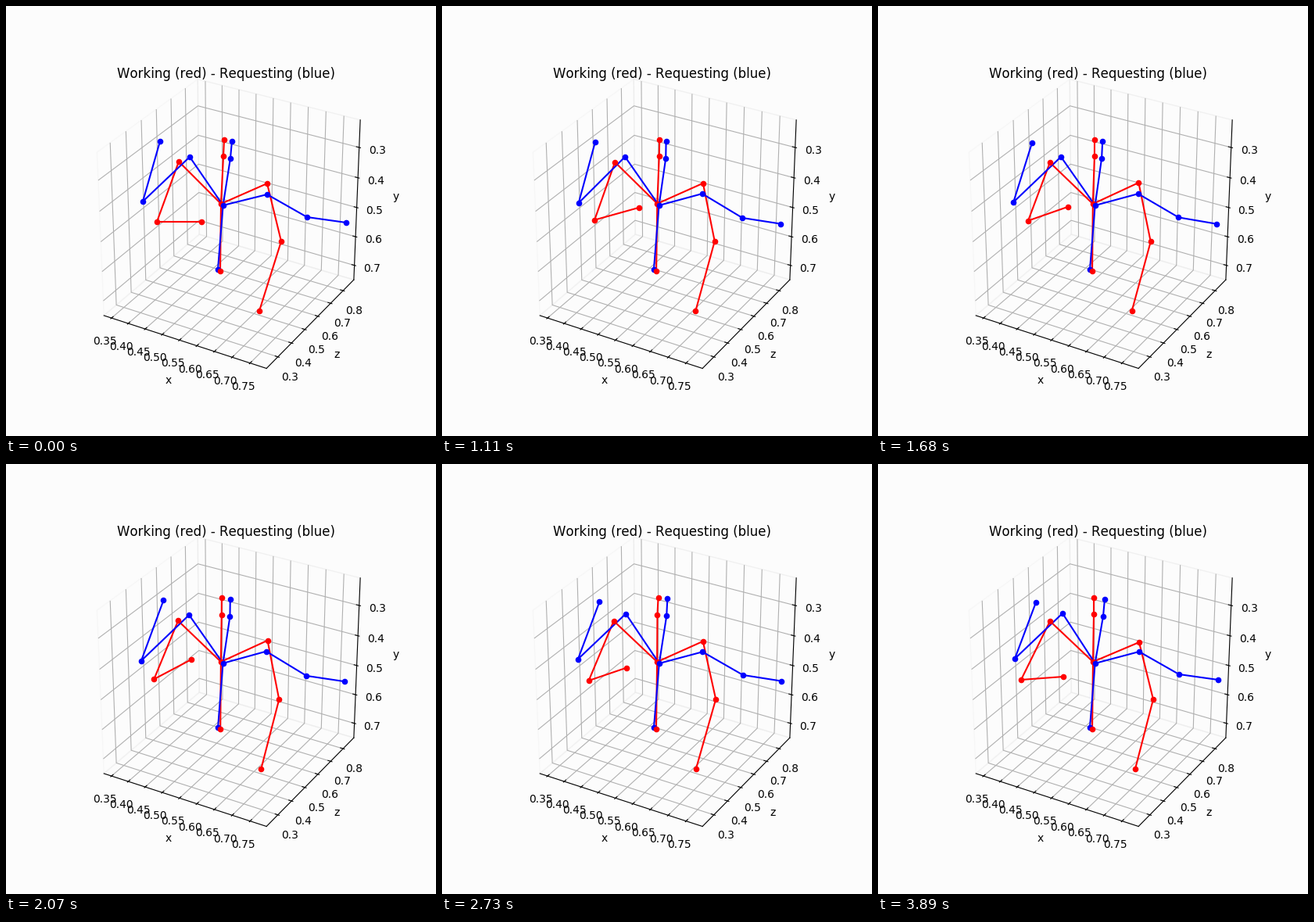
Animation, 550 px wide and 550 px high, one loop 3.92 s. Source, as a matplotlib script:

```python
import numpy as np
import matplotlib.pyplot as plt
from matplotlib.animation import FuncAnimation

SIZE, DPI = 550, 100
LOOP, STEP = 3920, 20
plt.rcParams["font.family"] = "DejaVu Sans"
plt.rcParams["text.kerning_factor"] = 6

fig = plt.figure(figsize=(SIZE / DPI, SIZE / DPI), dpi=DPI, facecolor="#fcfcfc")
ax = fig.add_axes([0, 0, 1, 1])
ax.set(xlim=(0, SIZE), ylim=(SIZE, 0))
ax.axis("off")

# Perspective camera around a unit cube centred on the origin
ELEV, AZIM, DIST = np.radians(30), np.radians(-60), 10
ce, se, ca, sa = np.cos(ELEV), np.sin(ELEV), np.cos(AZIM), np.sin(AZIM)
RIGHT = np.array([-sa, ca, 0])
UP = np.array([-se * ca, -se * sa, ce])
TOWARD = np.array([ce * ca, ce * sa, se])


def project(points):
    p = np.atleast_2d(np.asarray(points, float))
    depth = DIST - p @ TOWARD
    u = (p @ RIGHT / depth + 0.095) / 0.185
    v = (p @ UP / depth + 0.095) / 0.185
    return 68.75 + 426.25 * u, 489.5 - 423.5 * v


def path(points, color, width, zorder, **kw):
    ax.plot(*project(points), color=color, lw=width, zorder=zorder, **kw)


def put(point, text, va):
    x, y = project(point)
    ax.text(x[0], y[0], text, fontsize=10, ha="center", va=va, zorder=4)


E = 0.5 + 1 / 48         # half width of the drawn box
L = E + 0.0752           # tick label distance
N = E + 0.1634           # axis name distance
OUT, IN = 1 / 120, 1 / 60


def draw_box():
    panes = [
        ("#f2f2f2", [(-E, -E, -E), (-E, E, -E), (-E, E, E), (-E, -E, E)]),
        ("#e6e6e6", [(-E, E, -E), (E, E, -E), (E, E, E), (-E, E, E)]),
        ("#ececec", [(-E, -E, -E), (E, -E, -E), (E, E, -E), (-E, E, -E)]),
    ]
    for color, corners in panes:
        path(corners + corners[:1], color, 1, 0, alpha=0.5)

    def tick(grid, mark, label, text):
        path(grid, "#b0b0b0", 0.8, 1, solid_capstyle="butt")
        path(mark, "black", 0.8, 2)
        put(label, text, "top")

    for v in np.arange(0.35, 0.76, 0.05):
        c = (v - 0.5612) / 0.4494
        tick([(c, -E, -E), (c, E, -E), (c, E, E)],
             [(c, -E - OUT, -E), (c, -E + IN, -E)], (c, -L, -L), f"{v:.2f}")
    for v in np.arange(0.3, 0.81, 0.1):
        c = (v - 0.5533) / 0.643
        tick([(E, c, -E), (-E, c, -E), (-E, c, E)],
             [(E + OUT, c, -E), (E - IN, c, -E)], (L, c, -L), f"{v:.1f}")
    for v in np.arange(0.3, 0.71, 0.1):
        c = (0.481 - v) / 0.5184
        tick([(-E, -E, c), (-E, E, c), (E, E, c)],
             [(E + OUT, E, c), (E - IN, E, c)], (L, L, c), f"{v:.1f}")

    path([(-E, -E, -E), (E, -E, -E)], "black", 0.8, 2)
    path([(E, -E, -E), (E, E, -E)], "black", 0.8, 2)
    path([(E, E, -E), (E, E, E)], "black", 0.8, 2)
    put((0, -N, -N), "x", "center")
    put((N, 0, -N), "z", "center")
    put((N, N, 0), "y", "center")
    ax.text(281.9, 91.6, "Working (red) - Requesting (blue)",
            fontsize=12, ha="center", va="baseline")


draw_box()

# Joints
HEAD, NECK, CHEST, HIP, LS, LE, LH, RS, RE, RH = range(10)
SPINE = [HEAD, NECK, CHEST, HIP]
ARMS = [LH, LE, LS, CHEST, RS, RE, RH]

RED = [(279, 171), (278, 192.4), (275, 253), (274, 339), (221, 199),
       (193, 276), (250, 276), (334, 227), (352, 301), (324, 390)]
BLUE = [(289, 172.6), (287, 194.6), (277.6, 255), (271, 337), (235, 193),
        (175, 250), (197, 173), (334, 241), (385, 270), (435, 277)]

# Working arm: time, x, y
ELBOW = [(0, 193, 276), (720, 198, 273), (2100, 189, 275),
         (3000, 187, 278), (3890, 183, 276)]
HAND = [(0, 250, 276), (720, 258, 258), (1500, 246, 258),
        (2230, 235, 248.5), (3000, 237, 268), (3890, 237, 272)]


def ramp(t, start, end):
    return np.clip((t - start) / (end - start), 0, 1)


def along(keys, t):
    times, x, y = zip(*keys)
    return np.interp(t, times, x), np.interp(t, times, y)


def red_pose(t):
    t = min(t, 3000) + 890 * ramp(t, 3550, 3890)
    p = np.array(RED, float)
    turn = ramp(t, 700, 2070)
    arch = np.sin(np.pi * ramp(t, 0, 3300))
    p[HEAD, 0] -= 3 * turn
    p[NECK, 0] -= 2 * turn
    p[LS] += (-turn, 2 * ramp(t, 0, 3000))
    p[LE] = along(ELBOW, t)
    p[LH] = along(HAND, t)
    p[RS, 1] += ramp(t, 2400, 3000) - arch
    p[RE, 0] -= 3.7 * arch
    p[RH, 0] += ramp(t, 0, 1500) + 4 * ramp(t, 3000, 3890)
    return p


def blue_pose(t):
    p = np.array(BLUE, float)
    late = ramp(t, 2450, 3000)
    lean = ramp(t, 0, 700) - late
    p[HEAD, 0] += late - 2 * lean
    p[NECK, 0] += late - lean
    p[LS] += (late - lean, -2 * late)
    p[LE] += (-3 * lean * ramp(t, 700, 2400), 1.5 * lean - late)
    p[LH] += (5 * ramp(t, 1500, 2070) - lean, lean + 4 * late)
    p[RS] += (-1.2 * lean, -late - lean)
    p[RE] += (-0.8 * lean, 0.6 * lean - late)
    p[RH] += (-2 * lean, 1.5 * lean - late)
    return p


# The pose is sampled every 30 ms with some skips, then rarely near the end
rng = np.random.default_rng(4)
TIMES = [t for t in range(0, 3181, 30) if t <= 30 or rng.random() < 0.82]
TIMES = np.array(TIMES + [3370, 3430, 3490, 3550, 3740, 3820, 3890])
SHAKE = 0.35


def track(pose):
    poses = np.array([pose(t) for t in TIMES])
    noise = rng.normal(0, SHAKE, poses.shape)
    noise[:, [CHEST, HIP]] *= 0.4
    noise[(TIMES == 0) | (TIMES >= 3000)] = 0
    return poses + noise


red, blue = track(red_pose), track(blue_pose)
parts = []


def add(poses, joints, color, dots=False):
    style = dict(ls="", marker="o", ms=20 ** 0.5) if dots else dict(lw=1.5)
    line, = ax.plot([], [], color=color, zorder=5 + len(parts), **style)
    parts.append((poses, joints, line))


for poses, color in ((red, "red"), (blue, "blue")):
    add(poses, SPINE, color)
    add(poses, ARMS, color)
add(blue, [HEAD, NECK, HIP], "blue", dots=True)
add(red, list(range(10)), "red", dots=True)
add(blue, ARMS, "blue", dots=True)


def update(i):
    k = np.searchsorted(TIMES, (i + 0.5) * STEP, side="right") - 1
    for poses, joints, line in parts:
        line.set_data(*poses[k, joints].T)
    return [line for _, _, line in parts]


anim = FuncAnimation(fig, update, frames=LOOP // STEP, interval=STEP,
                     repeat=True, repeat_delay=0)
plt.show()
```
